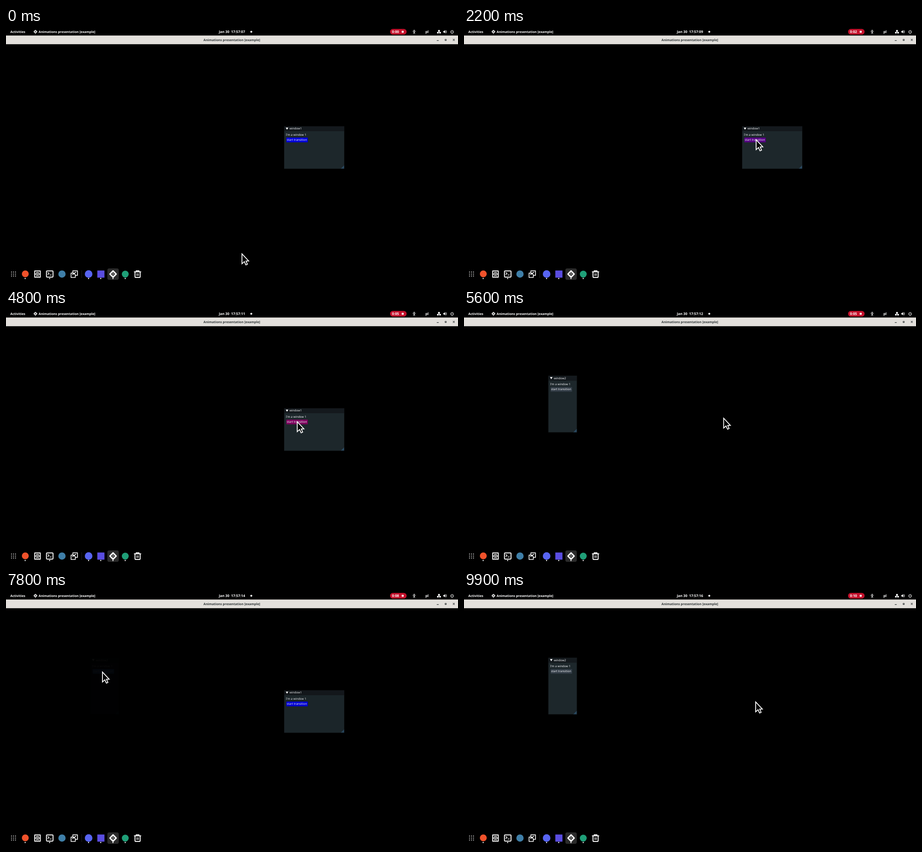
These frames come from a looping animation (998x561 px, 10 s). An HTML page:

```html
<!DOCTYPE html>
<html lang="en">
<head>
<meta charset="utf-8">
<style>
  html, body { margin: 0; width: 100%; height: 100%; overflow: hidden; background: #000; }
  svg { display: block; width: 998px; height: 561px; }
  text { font: 6.4px "Noto Sans", sans-serif; fill: #f4f5f8; white-space: pre; text-rendering: geometricPrecision; }
  .bar text { font-size: 7.1px; font-weight: 700; fill: #fff; }
  .bar .digits { font-size: 7.7px; }
  .bar .title { fill: #2e3436; text-anchor: middle; }
  .line { fill: none; stroke: #fff; stroke-width: 2; stroke-linejoin: round; stroke-linecap: round; }
  .thin { stroke-width: 1.1; }
  .dark { stroke: #2e3436; stroke-width: 1.2; }
  .white { fill: #fff; }
</style>
</head>
<body>
<svg viewBox="0 0 998 561">
  <defs>
    <g id="app">
      <rect class="white" x="-6.4" y="-6.4" width="12.8" height="12.8" rx="1.8" transform="rotate(45)"/>
      <path d="M0-4V4M-4 0H4" stroke="#000" stroke-width="2.6" stroke-dasharray="2.6 2.8"/>
      <circle r="1"/>
    </g>
  </defs>

  <g class="bar">
    <text x="9.5" y="10.6">Activities</text>
    <use href="#app" transform="translate(65 8.2) scale(.48)"/>
    <text x="72" y="10.6">Animations presentation [example]</text>
    <text id="clock" class="digits" x="470" y="10.8"></text>
    <circle class="white" cx="541.6" cy="8.3" r="2.1"/>
    <rect x="848" y="2" width="36.5" height="12.6" rx="6.3" fill="#c3102b"/>
    <text id="counter" class="digits" x="852.3" y="10.8"></text>
    <rect class="white" x="873.7" y="6.2" width="4.4" height="4.4" rx=".8"/>
    <circle class="white" cx="901.2" cy="5.2" r="1.1"/>
    <path class="line thin" d="M898.4 7.2H904M901.2 7.2V9.2M901.2 9L899.8 12M901.2 9L902.6 12"/>
    <text class="digits" x="926" y="10.6">pl</text>
    <path class="white" d="M954 4.4h4v3.2h-4zM951.8 9h3.6v3h-3.6zM956.6 9h3.6v3h-3.6z"/>
    <path class="line" style="stroke-width:.8" d="M956 7V8.3M953.6 9V8.3H958.4V9"/>
    <path class="white" d="M965.6 6.8h1.8l2.2-2.2v7.4l-2.2-2.2h-1.8z"/>
    <path class="line" style="stroke-width:.8" d="M970.8 6.6q1.2 1.7 0 3.4M972 5.2q2.2 3.1 0 6.2"/>
    <path class="line thin" d="M983 6.2a3.1 3.1 0 1 0 4 0M985 4.7V8"/>

    <rect y="16.6" width="998" height="19.2" fill="#e3e0dc"/>
    <text class="title" x="498.6" y="28.8">Animations presentation [example]</text>
    <path class="line dark" d="M951.6 27.6H955M969.5 25H972.1V27.6H969.5ZM987.1 24.7L990.3 27.9M990.3 24.7L987.1 27.9"/>
  </g>

  <g id="windows"></g>

  <g id="dock">
    <rect x="223.8" y="531" width="25.2" height="25.2" rx="4" fill="#2b2b2b"/>
    <path d="M167 535V552" stroke="#202020"/>
    <path class="line" stroke-dasharray="0 4.4" d="M12.2 539H21.4M12.2 543.4H21.4M12.2 547.8H21.4"/>
    <circle cx="42.6" cy="543" r="7.6" fill="#f0522b"/>
    <path class="line" d="M63.4 536.6H75.6V550.4H63.4ZM63.4 543.5H75.6"/>
    <path class="line" style="stroke-width:1.5" d="M67.4 541V539.8H71.6V541M67.4 548V546.8H71.6V548"/>
    <rect class="line" x="89.4" y="536.4" width="14.4" height="13.8" rx="1.4"/>
    <path class="line" style="stroke-width:1.5" d="M92.6 540L95.2 542.2L92.6 544.4M97 545.6H100"/>
    <circle cx="123.6" cy="543.4" r="8" fill="#3f7fa8"/>
    <path class="line" style="stroke-width:1.6" d="M147.5 541V536.4H157.8V546.4H154M143.6 541.4H149.6L153 545V551H143.6ZM147 544.5L154.4 539.4"/>
    <circle cx="182.4" cy="543.4" r="8.4" fill="#5865f2"/>
    <rect x="201.6" y="535.6" width="15.8" height="15.8" fill="#5a4de0"/>
    <use href="#app" x="236.4" y="543.4"/>
    <circle cx="263.3" cy="543.6" r="7.6" fill="#1f9f78"/>
    <path class="line" d="M283.4 538.6H297.6M287.4 538V536.2H293.6V538M284.8 539V549.2Q284.8 551 286.6 551H294.4Q296.2 551 296.2 549.2V539"/>
    <path class="line" style="stroke-width:1.4" d="M289 542.4V547M292 542.4V547"/>
    <path class="line" style="stroke-width:2.6" d="M42.3 553.3h0M96.4 553.3h0M182.3 553.3h0M209.2 553.3h0M236.2 553.3h0M263.2 553.3h0"/>
  </g>

  <path id="cursor" d="M0 .8V22.6L5.2 17.9L8.6 25.2L12 23.7L8.9 16.6H14.8Z" stroke="#fff" stroke-width="1.8"/>
</svg>

<script>
const $ = id => document.getElementById(id);
const LOOP = 10000, STEP = 100;

// Keys are [time, ...values].
const cursorKeys = [
  [100, 521, 498], [1100, 526, 262], [1900, 645, 246], [3050, 645, 246],
  [3400, 645, 258], [4100, 645, 258], [4400, 643, 246], [5300, 643, 246],
  [6500, 197, 196], [6700, 197, 196], [7200, 213, 176], [7800, 213, 176],
  [8800, 644, 242]
];
const hoverKeys = [
  [1750, 0], [2800, 1], [3150, 1], [4150, 0], [4250, 0], [5250, 1],
  [6200, 0], [8750, 0], [9650, 1]
];
const fadeKeys = [[5200, 1], [5600, 0], [7450, 0], [7850, 1], [9200, 1], [9600, 0]];

function valuesAt(keys, t) {
  const next = keys.findIndex(key => key[0] > t);
  if (next === 0) return keys[0].slice(1);
  if (next < 0) return keys[keys.length - 1].slice(1);
  const [t0, ...from] = keys[next - 1], [t1, ...to] = keys[next];
  const p = (t - t0) / (t1 - t0), eased = p * p * (3 - 2 * p);
  return from.map((v, i) => v + (to[i] - v) * eased);
}

function panel(name, x, y, w, h) {
  return `<g id="${name}" transform="translate(${x} ${y})">
    <rect width="${w}" height="${h}" fill="#1d272b"/>
    <rect width="${w}" height="11" fill="#14191d"/>
    <path class="white" d="M3.7 2.9H9.3L6.5 7.7Z"/>
    <text x="12" y="7.4">${name}</text>
    <text x="4" y="21">I'm a window 1</text>
    <rect class="button" x="5" y="25" width="47.4" height="10.4" rx="1"/>
    <text x="6" y="32.3">start transition</text>
    <path d="M${w} ${h}v-8l-8 8z" fill="#2a4a62"/>
    <rect x=".25" y=".25" width="${w - 0.5}" height="${h - 0.5}" fill="none" stroke="#14191d" stroke-width=".5"/>
  </g>`;
}
$("windows").innerHTML = panel("window1", 614, 217, 133, 94) + panel("window2", 186.2, 145.2, 63, 125);
const [button1, button2] = document.querySelectorAll(".button");

function draw(now) {
  const t = Math.floor(now % LOOP / STEP) * STEP;
  const two = n => String(n).padStart(2, "0");
  $("clock").textContent = `Jan 30  17:57:${two(Math.floor(7.05 + t / 1000))}`;
  $("counter").textContent = `0:${two(Math.floor(0.25 + t / 1000))}`;

  const [hover] = valuesAt(hoverKeys, t), [fade] = valuesAt(fadeKeys, t);
  button1.setAttribute("fill", `rgb(${218 * hover} 0 ${218 * (1 - hover)})`);
  button2.setAttribute("fill", t >= 7100 && t < 8000 ? "#478fff" : "#333d47");
  $("window1").setAttribute("opacity", fade);
  $("window2").setAttribute("opacity", 1 - fade);
  $("cursor").setAttribute("transform", `translate(${valuesAt(cursorKeys, t)})`);
  requestAnimationFrame(draw);
}
draw(performance.now());
</script>
</body>
</html>
```
